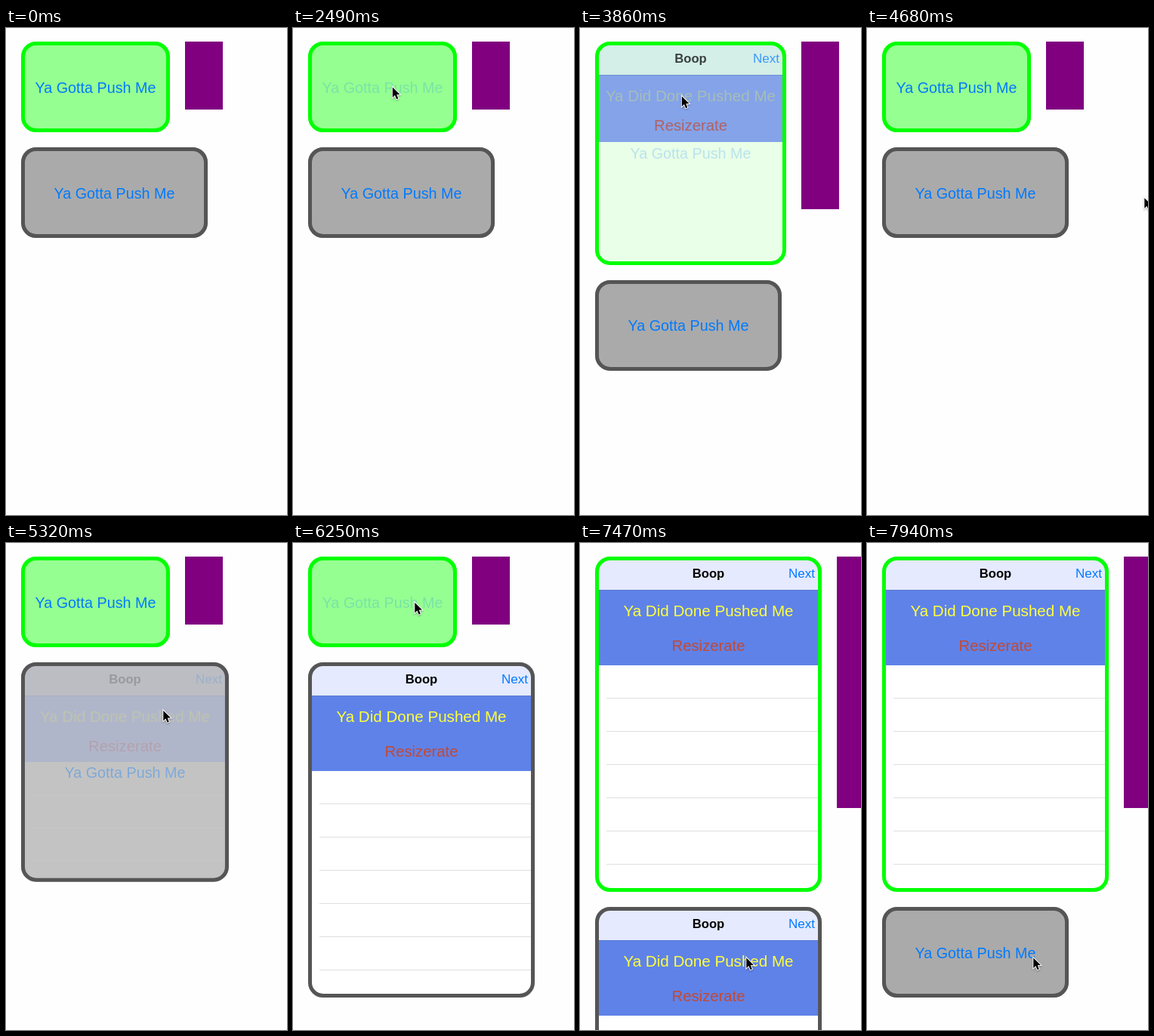
An HTML page with a canvas that plays this animation: 372 px wide and 645 px high, repeating every 7990 ms.

```html
<!DOCTYPE html>
<html lang="en">
<head>
<meta charset="utf-8">
<title>Expanding panels</title>
<style>
  html, body { margin: 0; width: 100%; height: 100%; overflow: hidden; background: #fefefe; }
  canvas { display: block; width: 372px; height: 645px; }
</style>
</head>
<body>
<canvas id="stage" width="372" height="645"></canvas>
<script>
const ctx = document.getElementById('stage').getContext('2d');
const LOOP = 7990;
const FAMILY = '"Liberation Sans", Arial, sans-serif';

// Bursts of screen updates: [start, step, count]
const BURSTS = [
  [1500, 57.7, 10], [2490, 90, 2], [2640, 60, 4], [3060, 56.6, 4],
  [3400, 57.5, 9], [3910, 80, 4], [4680, 64, 11], [5380, 55, 3],
  [5770, 60, 6], [6250, 70, 10], [7060, 63.3, 13], [7880, 60, 2]
];

// Pointer moves: [start, end, x, y]
const MOVES = [
  [1500, 2019, 131, 77], [3030, 3229, 285, 42], [3380, 3640, 134, 89],
  [3900, 4150, 385, 94], [4600, 5000, 207.5, 220.5], [5740, 6070, 160.5, 77.5],
  [6620, 6880, 196, 479], [7040, 7400, 219.5, 548]
];

// Panel toggles: press, animation start, animation end, open or closed
const GREEN = {
  border: '#00ff00', fill: '#96ff91', width: 197,
  toggles: [
    { press: 2490, start: 2534, end: 2834, open: true },
    { press: 3650, start: 3708, end: 4028, open: false },
    { press: 6250, start: 6292, end: 6592, open: true }
  ]
};
const GREY = {
  border: '#555555', fill: '#aaaaaa', width: 247,
  toggles: [
    { press: 5100, start: 5155, end: 5475, open: true },
    { press: 7560, start: 7614, end: 7934, open: false }
  ]
};

const clamp = v => Math.min(1, Math.max(0, v));
const mix = (a, b, k) => a + (b - a) * k;
const smooth = k => k * k * (3 - 2 * k);

// cubic-bezier(.42, 0, .58, 1)
function easeInOut(x) {
  let u = x;
  for (let i = 0; i < 6; i++) {
    const v = 1 - u;
    const error = 1.26 * u * v * v + 1.74 * u * u * v + u * u * u - x;
    u -= error / (1.26 * v * v + 0.96 * u * v + 1.26 * u * u);
  }
  return smooth(u);
}

const reveal = k => Math.max(k * k, 1 - 1.5 * (1 - k));

function snapTime(t) {
  const burst = BURSTS.filter(b => b[0] <= t).pop();
  if (!burst) return t;
  const [start, step, count] = burst;
  const n = Math.floor((t - start) / step + 1e-6);
  return n < count ? start + n * step : t;
}

function panelState(panel, t) {
  const state = { size: 0, cover: 0, button: 1, header: 1 };
  for (const { press, start, end, open } of panel.toggles) {
    if (t < press) break;
    if (t < start) {
      if (open) state.button = 0.2;
      else state.header = 0.4;
      break;
    }
    const k = easeInOut(clamp((t - start) / (end - start)));
    state.size = open ? k : 1 - k;
    state.cover = open ? reveal(k) : 1 - reveal(k);
    state.button = open ? 0.75 * (1 - k) : reveal(k);
    state.header = open ? 1 : 0.4;
    state.rules = open;
  }
  state.width = mix(panel.width, 300, state.size);
  state.height = mix(120, 444, state.size);
  return state;
}

function box(color, x, y, w, h, alpha = 1) {
  ctx.globalAlpha = alpha;
  ctx.fillStyle = color;
  ctx.fillRect(x, y, w, h);
}

function label(text, x, y, size, color, alpha, align = 'center', weight = 'normal') {
  ctx.globalAlpha = alpha;
  ctx.font = `${weight} ${size}px ${FAMILY}`;
  ctx.textAlign = align;
  ctx.fillStyle = color;
  ctx.fillText(text, x, y);
}

function drawTable(s, x, y) {
  const { width, height, size, cover } = s;
  const alpha = Math.pow(cover, 1.35);
  const center = x + width / 2;
  const navBottom = Math.round(y + 44);
  const headBottom = Math.round(y + 144 - 25 * (1 - size));

  box('#e5eaff', x, y, width, navBottom - y, cover);
  box('#ffffff', x, navBottom, width, y + height - navBottom, cover);
  box('#5f82e9', x, navBottom, width, headBottom - navBottom, alpha);
  box('#5774bd', x, navBottom, width, 1, alpha * 0.6);
  if (s.rules) {
    for (let line = headBottom + 43; line < y + height - 5; line += 44) {
      box('#dfdfe1', x + 15, line, width - 15, 1, alpha);
    }
  }
  label('Boop', center, y + 28, 16.6, '#000000', alpha, 'center', 'bold');
  label('Next', x + width - 9, y + 28, 17, '#007aff', alpha, 'right');
  label('Ya Did Done Pushed Me', center, y + 78.5, 20.6, '#ffff3c', alpha * s.header);
  label('Resizerate', center, y + 124.5 - 14 * (1 - size), 20.3, '#c04a36', alpha);
}

function drawPanel(panel, s, x, y) {
  const { width, height } = s;
  ctx.save();
  ctx.beginPath();
  ctx.roundRect(x, y, width, height, 20);
  ctx.clip();
  box(panel.fill, x, y, width, height);
  if (s.cover > 0) drawTable(s, x, y);
  label('Ya Gotta Push Me', x + width / 2, y + height / 2 + 7.5, 19.75, '#007aff', s.button);
  ctx.restore();

  ctx.beginPath();
  ctx.roundRect(x + 2.5, y + 2.5, width - 5, height - 5, 17.5);
  ctx.lineWidth = 5;
  ctx.strokeStyle = panel.border;
  ctx.stroke();
}

function pointerAt(t) {
  let x = 350, y = 188;
  for (const [start, end, toX, toY] of MOVES) {
    const k = smooth(clamp((t - start) / (end - start)));
    x = mix(x, toX, k);
    y = mix(y, toY, k);
  }
  // The pointer comes back in lower than where it left.
  if (t >= 4150 && t < 5000) y += 130 * (1 - smooth(clamp((t - 4600) / 400)));
  return [x, y];
}

function drawPointer(t) {
  if (t < 1500) return;
  ctx.save();
  ctx.translate(...pointerAt(t));
  ctx.beginPath();
  ctx.moveTo(0.8, 1.5);
  ctx.lineTo(0.8, 15);
  ctx.lineTo(3.9, 12.1);
  ctx.lineTo(6.1, 17.2);
  ctx.lineTo(8.3, 16.2);
  ctx.lineTo(6.2, 11.3);
  ctx.lineTo(10.4, 11.1);
  ctx.closePath();
  ctx.lineWidth = 2;
  ctx.strokeStyle = '#ffffff';
  ctx.shadowColor = 'rgba(0, 0, 0, 0.35)';
  ctx.shadowBlur = 2;
  ctx.shadowOffsetY = 1;
  ctx.stroke();
  ctx.shadowColor = 'transparent';
  ctx.fillStyle = '#000000';
  ctx.fill();
  ctx.restore();
}

function draw(t) {
  const green = panelState(GREEN, t);
  const grey = panelState(GREY, t);
  box('#fefefe', 0, 0, 372, 645);
  box('#800080', 40 + green.width, 18, 50, green.height * 0.75);
  drawPanel(GREEN, green, 20, 18);
  drawPanel(GREY, grey, 20, 38 + green.height);
  drawPointer(t);
}

function tick() {
  draw(snapTime(performance.now() % LOOP));
  requestAnimationFrame(tick);
}
tick();
</script>
</body>
</html>
```
